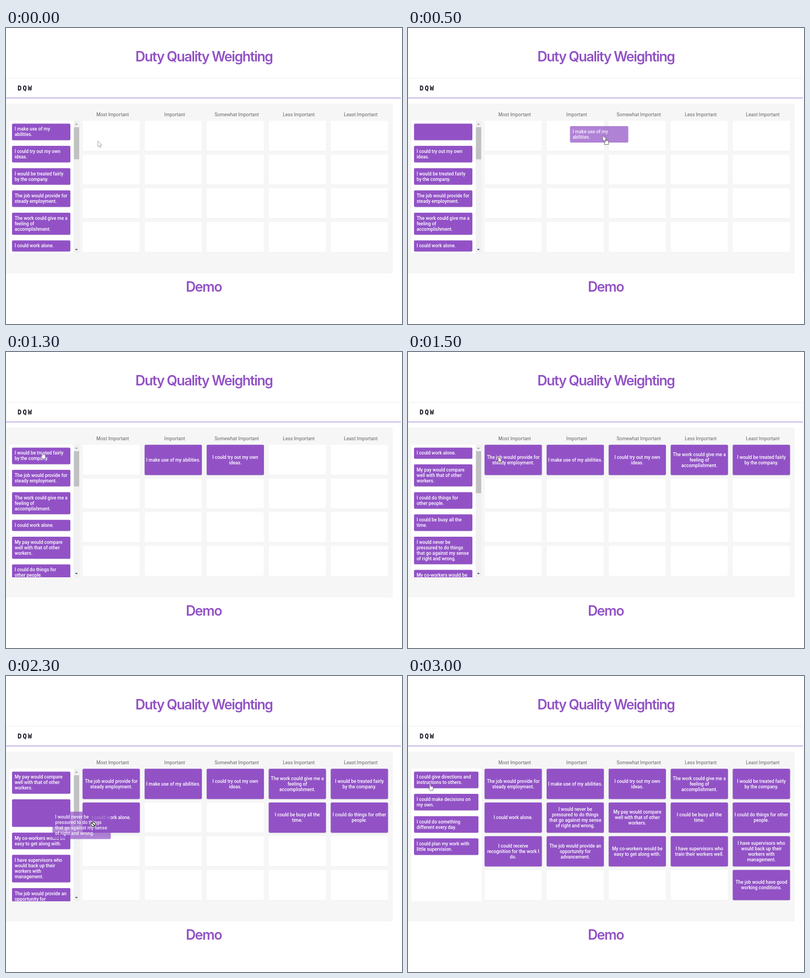
Write an HTML page with a canvas that moves like this. It is 720 px wide and 540 px high and loops after 3.5 s.

```html
<!DOCTYPE html>
<html lang="en">
<head>
<meta charset="utf-8">
<title>Duty Quality Weighting</title>
<style>
  html, body { margin: 0; width: 100%; height: 100%; overflow: hidden; background: #fff; }
  canvas { display: block; }
</style>
</head>
<body>
<canvas id="stage" width="720" height="540"></canvas>
<script>
const ctx = document.getElementById('stage').getContext('2d');
const PURPLE = '#9252c6';
const STEP = 500;
const LINE = 10, GAP = 10.6, CARD_X = 11, LIST_TOP = 174.5;
const VIEW = { x: 6, y: 169, w: 128, h: 242 };

const statements = [
  'I make use of my|abilities.',
  'I could try out my own|ideas.',
  'I would be treated fairly|by the company.',
  'The job would provide for|steady employment.',
  'The work could give me a|feeling of|accomplishment.',
  'I could work alone.',
  'My pay would compare|well with that of other|workers.',
  'I could do things for|other people.',
  'I could be busy all the|time.',
  'I would never be|pressured to do things|that go against my sense|of right and wrong.',
  'My co-workers would be|easy to get along with.',
  'I have supervisors who|would back up their|workers with|management.',
  'The job would provide an|opportunity for|advancement.',
  'I could receive|recognition for the work I|do.',
  'I have supervisors who|train their workers well.',
  'The job would have good|working conditions.',
  'I could give directions|and instructions to|others.',
  'I could make decisions on|my own.',
  'I could do something|different every day.',
  'I could plan my work with|little supervision.'
];
// Line breaks that differ where there is more room
const inCell = { 0: 'I make use of my abilities.', 7: 'I could do things for other|people.' };
const inWideList = { 16: 'I could give directions and|instructions to others.' };
const columns = ['Most Important', 'Important', 'Somewhat Important', 'Less Important', 'Least Important'];

// Grid rows hold statement indexes; -1 is an empty cell
const firstRow = [3, 0, 1, 4, 2];
const scenes = [
  { grid: [], cursor: [arrow, 167, 206, '#99a'] },
  { grid: [], drag: [0, 294.5, 179], cursor: [copyArrow, 354, 196] },
  { grid: [[-1, 0, 1]], cursor: [hand, 63, 183] },
  { grid: [firstRow], cursor: [arrow, 164, 191, '#654'] },
  { grid: [firstRow, [5, -1, -1, 8, 7]], drag: [9, 84.5, 247.5], cursor: [noDrop, 158.5, 270.5] },
  { grid: [firstRow, [5, 9, 6, 8, 7], [-1, -1, 10, -1, 11]], cursor: [hand, 69, 189] },
  { grid: [firstRow, [5, 9, 6, 8, 7], [13, 12, 10, 14, 11], [-1, -1, -1, -1, 15]], cursor: [hand, 37, 197] }
];

function rect(x, y, w, h, color) {
  ctx.fillStyle = color;
  ctx.fillRect(x, y, w, h);
}

function text(str, x, y, font, color, align = 'left', spacing = 0) {
  ctx.font = font;
  ctx.fillStyle = color;
  ctx.textAlign = align;
  ctx.letterSpacing = spacing + 'px';
  ctx.fillText(str, x, y);
}

function box(x, y, w, h, color, shadow = 'transparent') {
  ctx.save();
  ctx.shadowColor = shadow;
  ctx.shadowBlur = 1;
  ctx.shadowOffsetY = 0.5;
  ctx.fillStyle = color;
  ctx.beginPath();
  ctx.roundRect(x, y, w, h, 2);
  ctx.fill();
  ctx.restore();
}

function card(x, y, w, h) {
  box(x, y, w, h, PURPLE, 'rgba(70,20,120,.4)');
}

function lines(str, x, middle, align) {
  const rows = str.split('|');
  rows.forEach((row, i) => text(row, x, middle + (i - (rows.length - 1) / 2) * LINE + 2.8,
    '500 8.45px Roboto, sans-serif', '#fff', align));
}

const cardHeight = str => (str.split('|').length + 1) * LINE;

function shape(points, fill, stroke) {
  ctx.beginPath();
  points.forEach(([x, y]) => ctx.lineTo(x, y));
  ctx.closePath();
  ctx.fillStyle = fill;
  ctx.fill();
  if (stroke) {
    ctx.strokeStyle = stroke;
    ctx.lineWidth = 0.9;
    ctx.stroke();
  }
}

function arrow(x, y, outline) {
  const points = [[0, 0], [0, 10.5], [2.4, 8.4], [4, 12], [5.7, 11.2], [4.2, 7.8], [7.4, 7.6]];
  shape(points.map(([px, py]) => [x + px, y + py]), '#fff', outline);
}

function copyArrow(x, y) {
  ctx.strokeStyle = '#777';
  ctx.lineWidth = 1;
  rect(x + 3, y + 9, 7, 7, '#fff');
  ctx.strokeRect(x + 3.5, y + 9.5, 7, 7);
  arrow(x, y, '#666');
}

function hand(x, y) {
  const points = [[2, 0.5], [3.3, 0], [4.2, 1], [4.3, 4], [7.7, 4.7], [9, 6], [8.8, 9],
    [7.8, 12], [3.4, 12], [0, 7.5], [0.7, 6.5], [2.3, 7.7]];
  shape(points.map(([px, py]) => [x + px, y + py]), '#fff', '#70588a');
}

function noDrop(x, y) {
  ctx.beginPath();
  ctx.arc(x, y, 4.2, 0, Math.PI * 2);
  ctx.moveTo(x - 3, y - 3);
  ctx.lineTo(x + 3, y + 3);
  ctx.fillStyle = '#fff';
  ctx.fill();
  ctx.strokeStyle = '#fff';
  ctx.lineWidth = 3;
  ctx.stroke();
  ctx.strokeStyle = '#222';
  ctx.lineWidth = 1.4;
  ctx.stroke();
}

function drawPage() {
  rect(0, 0, 720, 540, '#fff');
  const heading = '600 25px Inter, sans-serif';
  text('Duty Quality Weighting', 360, 60.6, heading, PURPLE, 'center', -1.35);
  text('Demo', 359.5, 480.6, heading, PURPLE, 'center', -1.35);
  rect(0, 91, 719, 1, '#f0f0f0');
  rect(0, 91, 1, 36, '#f0f0f0');
  rect(718, 91, 1, 357, '#f6f6f6');
  rect(0, 127, 718, 1.2, '#a58ed4');
  text('DQW', 21, 113.6, 'bold 12px "DejaVu Sans Mono", monospace', '#15101c', 'left', 2.2);
  rect(0, 138, 703, 310, '#f6f6f6');
}

function drawGrid(grid) {
  columns.forEach((name, col) => {
    const x = 139.3 + col * 112.8;
    text(name, x + 54.6, 161, '8.6px Roboto, sans-serif', '#666', 'center');
    for (let row = 0; row < 4; row++) {
      const y = 169.3 + row * 61.5;
      const id = grid[row]?.[col] ?? -1;
      if (id < 0) {
        box(x, y, 104, 55, '#fff', 'rgba(0,0,0,.05)');
      } else {
        card(x, y, 104, 55);
        lines(inCell[id] ?? statements[id], x + 52, y + 27.5, 'center');
      }
    }
  });
}

function drawScrollbar(content) {
  rect(123, VIEW.y, 11, VIEW.h, '#f1f1f1');
  rect(123.5, 181, 9.5, 218 * VIEW.h / content, '#c1c1c1');
  shape([[125.5, 176.5], [130.5, 176.5], [128, 173.8]], '#999');
  shape([[125.5, 403], [130.5, 403], [128, 405.8]], '#505078');
}

function drawList(grid, dragged) {
  const placed = grid.flat();
  const ids = statements.map((_, id) => id).filter(id => !placed.includes(id));
  const content = LINE + ids.reduce((sum, id) => sum + cardHeight(statements[id]) + GAP, 0);
  const scrolls = content > VIEW.h;
  ctx.save();
  ctx.beginPath();
  ctx.rect(VIEW.x, VIEW.y, VIEW.w, VIEW.h);
  ctx.clip();
  rect(VIEW.x, VIEW.y, VIEW.w, VIEW.h, '#fff');
  let y = LIST_TOP;
  for (const id of ids) {
    const str = (!scrolls && inWideList[id]) || statements[id];
    const h = cardHeight(str);
    card(CARD_X, y, scrolls ? 106 : 117, h);
    if (id !== dragged) lines(str, CARD_X + 4.7, y + h / 2);
    y += h + GAP;
  }
  if (scrolls) drawScrollbar(content);
  ctx.restore();
}

function drawDrag([id, x, y]) {
  const h = cardHeight(statements[id]);
  ctx.globalAlpha = 0.72;
  box(x, y, 106, h, PURPLE);
  ctx.globalAlpha = 0.9;
  lines(statements[id], x + 4.7, y + h / 2);
  ctx.globalAlpha = 1;
}

function draw() {
  const scene = scenes[Math.floor(performance.now() / STEP) % scenes.length];
  drawPage();
  drawGrid(scene.grid);
  drawList(scene.grid, scene.drag?.[0]);
  if (scene.drag) drawDrag(scene.drag);
  const [cursor, ...args] = scene.cursor;
  cursor(...args);
  requestAnimationFrame(draw);
}
draw();
</script>
</body>
</html>
```
